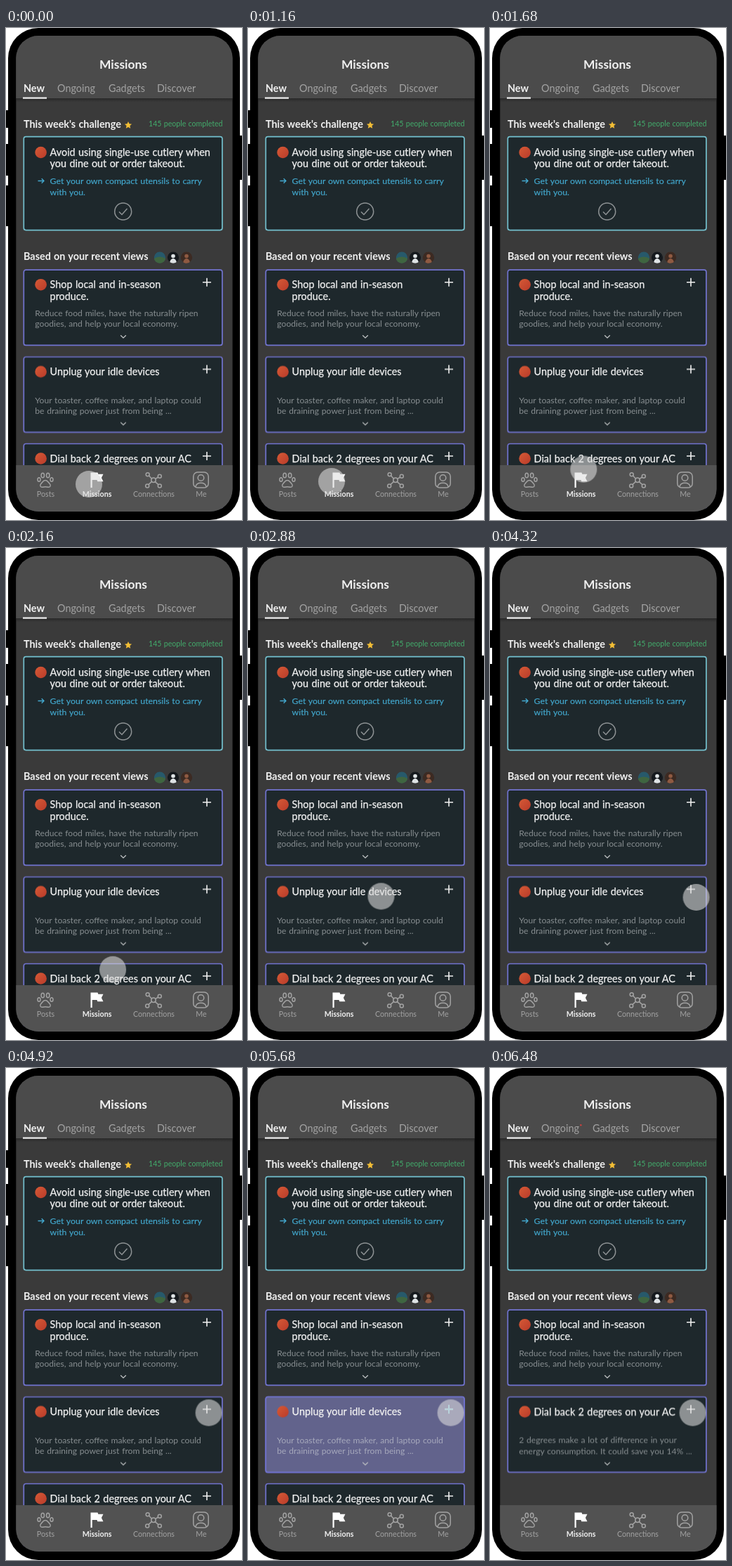
Write an HTML page that moves like this. It is 336 by 700 pixels and loops after 7480 ms.

```html
<!DOCTYPE html>
<html lang="en">
<head>
<meta charset="utf-8">
<title>Missions</title>
<style>
html, body { margin: 0; width: 100%; height: 100%; overflow: hidden; background: #fff; }
svg { display: block; width: 100%; height: 100%; }
text { font-family: Lato, "Open Sans", sans-serif; word-spacing: .05em; fill: #f1f1f1; }
.mid { text-anchor: middle; }
.bold { font-weight: 700; }
.tab { font-size: 14.4px; }
.head { font-size: 14.4px; font-weight: 700; }
.name { font-size: 14.4px; stroke: #f1f1f1; stroke-width: .25; }
.body { font-size: 12.15px; fill: #dfe2e4; fill-opacity: .55; }
.tip { font-size: 12.35px; fill: #43a9cf; stroke: #43a9cf; stroke-width: .15; }
.nav { font-size: 10.7px; text-anchor: middle; }
.dim { fill: #a2a2a2; }
.line { fill: none; stroke: #a2a2a2; stroke-width: 1.5; stroke-linecap: round; stroke-linejoin: round; }
.card { fill: #1e282c; stroke: #7173cf; stroke-width: 1.7; }

#cursor, #glow, #tint, #idle, #next, #badge { animation: 7480ms linear infinite both; }
#cursor { animation-name: travel; }
#glow, #tint { animation-name: glow; }
#idle { animation-name: leave; }
#next { animation-name: rise; }
#badge { animation-name: badge; }

@keyframes travel {
  0%, 10.7% { transform: translate(118px, 649px); }
  15.51% { transform: translate(119px, 645px); }
  20.32% { transform: translate(127px, 637px); }
  28.88% { transform: translate(152px, 600px); }
  30.48% { transform: translate(162px, 562px); }
  32.75% { transform: translate(177px, 522px); animation-timing-function: ease-out; }
  37.43%, 51.87% { transform: translate(189.5px, 495.5px); animation-timing-function: ease-in-out; }
  58.3% { transform: translate(295px, 497px); }
  60.96% { transform: translate(294px, 498px); animation-timing-function: ease-out; }
  64.17%, 100% { transform: translate(288.6px, 490.5px); }
}
@keyframes glow {
  0%, 71.66% { opacity: 0; }
  74.33%, 100% { opacity: 1; }
}
@keyframes leave {
  0%, 77.54% { opacity: 1; }
  81.28%, 100% { opacity: 0; }
}
@keyframes rise {
  0%, 79.14% { transform: translate(0, 591px); animation-timing-function: ease-in-out; }
  86.1%, 100% { transform: translate(0, 467.5px); }
}
@keyframes badge {
  0%, 86.1% { opacity: 0; }
  86.63%, 100% { opacity: 1; }
}
</style>
</head>
<body>
<svg viewBox="0 0 336 700">
  <defs>
    <clipPath id="screen"><rect x="14.3" y="11" width="308.2" height="677" rx="32"/></clipPath>
    <linearGradient id="shade" x2="0" y2="1">
      <stop offset="0" stop-color="#222" stop-opacity=".7"/>
      <stop offset="1" stop-color="#222" stop-opacity="0"/>
    </linearGradient>
    <linearGradient id="disc" x2="1" y2="1">
      <stop offset="0" stop-color="#d65a36"/>
      <stop offset="1" stop-color="#b93b2a"/>
    </linearGradient>
    <clipPath id="face"><circle r="8.3"/></clipPath>
    <rect id="box" x="25.3" y=".5" width="282.6" height="107.2" rx="3"/>
    <path id="plus" d="M280 18h12M286 12v12" fill="none" stroke-width="1.6"/>
    <g id="marks">
      <circle cx="49.6" cy="21.5" r="8.3" fill="url(#disc)"/>
      <use href="#plus" stroke="#f1f1f1"/>
      <path d="M163.2 93.6l3.8 3.6 3.8-3.6" fill="none" stroke="#c4c7c8" stroke-width="1.3"/>
    </g>
    <g id="person">
      <circle cy="-2" r="2.8"/>
      <path d="M-5 9C-5 -1 5 -1 5 9z"/>
    </g>
  </defs>

  <!-- phone body -->
  <path d="M0 117h5v25H0zM0 165h5v45H0zM0 224h5v58H0zM330 153h6v63h-6z"/>
  <rect x="3" width="330" height="700" rx="43"/>

  <g clip-path="url(#screen)">
    <rect x="14" y="11" width="309" height="677" fill="#3a3a3a"/>

    <!-- weekly challenge -->
    <text class="head" x="25" y="142">This week's challenge</text>
    <path d="M174 133l1.5 3.3 3.6.4-2.7 2.4.8 3.6-3.2-1.8-3.2 1.8.8-3.6-2.7-2.4 3.6-.4z" fill="#f2bd35"/>
    <text x="308.5" y="140" text-anchor="end" font-size="10.6" style="fill:#42ab6b">145 people completed</text>
    <rect x="25.3" y="154.6" width="282.6" height="133" rx="3" fill="#1e282c" stroke="#72bfcd" stroke-width="1.7"/>
    <circle cx="49.6" cy="177" r="8.3" fill="url(#disc)"/>
    <text class="name" x="62.6" y="182">Avoid using single-use cutlery when</text>
    <text class="name" x="62.6" y="198.4">you dine out or order takeout.</text>
    <path d="M45.5 217.5h8.5m-3.3-3.2l3.3 3.2-3.3 3.2" fill="none" stroke="#43a9cf" stroke-width="1.3"/>
    <text class="tip" x="62.5" y="222.4">Get your own compact utensils to carry</text>
    <text class="tip" x="62.5" y="238">with you.</text>
    <g fill="none" stroke="#8d9294" stroke-width="1.5">
      <circle cx="166.7" cy="261" r="12"/>
      <path d="M161 261.5l4 4 7.5-8.5"/>
    </g>

    <!-- suggestions -->
    <text class="head" x="25" y="330">Based on your recent views</text>
    <g transform="translate(219 326.5)" clip-path="url(#face)">
      <circle r="8.3" fill="#27596b"/>
      <path d="M-9 2q9-6 18 0v7h-18z" fill="#3f6540"/>
    </g>
    <g transform="translate(238 326.5)" clip-path="url(#face)">
      <circle r="8.3" fill="#15191d"/>
      <use href="#person" fill="#dfe3e5"/>
    </g>
    <g transform="translate(257 326.5)" clip-path="url(#face)">
      <circle r="8.3" fill="#3c2a22"/>
      <use href="#person" fill="#8f5a42"/>
    </g>

    <g transform="translate(0 343.7)">
      <use href="#box" class="card"/>
      <use href="#marks"/>
      <text class="name" x="62.6" y="26.5">Shop local and in-season</text>
      <text class="name" x="62.6" y="43">produce.</text>
      <text class="body" x="41.3" y="66">Reduce food miles, have the naturally ripen</text>
      <text class="body" x="41.3" y="81.5">goodies, and help your local economy.</text>
    </g>

    <g id="idle">
      <g transform="translate(0 467.5)">
        <use href="#box" class="card"/>
        <use id="glow" href="#box" fill="#62638c" stroke="#7173cf" stroke-width="1.7"/>
        <use href="#marks"/>
        <use id="tint" href="#plus" stroke="#72c6dc"/>
        <text class="name" x="62.6" y="26.5">Unplug your idle devices</text>
        <text class="body" x="41.3" y="66">Your toaster, coffee maker, and laptop could</text>
        <text class="body" x="41.3" y="81.5">be draining power just from being ...</text>
      </g>
    </g>

    <g id="next">
      <use href="#box" class="card"/>
      <use href="#marks"/>
      <text class="name" x="62.6" y="26.5">Dial back 2 degrees on your AC</text>
      <text class="body" x="41.3" y="66">2 degrees make a lot of difference in your</text>
      <text class="body" x="41.3" y="81.5">energy consumption. It could save you 14% ...</text>
    </g>

    <!-- header -->
    <rect x="14" y="100" width="309" height="5" fill="url(#shade)"/>
    <rect x="14" y="11" width="309" height="89" fill="#4b4b4b"/>
    <text class="mid bold" x="167" y="58" font-size="17.4">Missions</text>
    <text class="tab bold" x="25" y="91">New</text>
    <text class="tab dim" x="73" y="91">Ongoing</text>
    <text class="tab dim" x="146" y="91">Gadgets</text>
    <text class="tab dim" x="215" y="91">Discover</text>
    <rect x="24" y="98.5" width="34" height="2.2" fill="#f1f1f1"/>
    <circle id="badge" cx="129.3" cy="81.3" r="1.3" fill="#c8423f"/>

    <!-- navigation -->
    <rect x="14" y="622" width="309" height="67" fill="#525252"/>
    <g class="line">
      <path d="M56 643.5c-3.4 0-4.2 3.2-6.2 5-2.3 2.3-.6 5.4 2.4 4.7q3.8-1 7.6 0c3 .7 4.7-2.4 2.4-4.7-2-1.8-2.8-5-6.2-5z"/>
      <ellipse cx="52.3" cy="636.5" rx="2.2" ry="3.3"/>
      <ellipse cx="59.7" cy="636.5" rx="2.2" ry="3.3"/>
      <ellipse cx="47" cy="642.5" rx="2" ry="2.8"/>
      <ellipse cx="65" cy="642.5" rx="2" ry="2.8"/>
      <path d="M207.5 641.2l-4-4.2M212.6 641.6l4-2.6M207.4 645.4l-4.4 4.2M212.4 645.6l4.4 4"/>
      <circle cx="210" cy="643.3" r="3.2"/>
      <circle cx="201.7" cy="635.2" r="2.5"/>
      <circle cx="218.8" cy="637.8" r="2.5"/>
      <circle cx="201.2" cy="651.6" r="2.5"/>
      <circle cx="218.8" cy="651.4" r="2.5"/>
      <rect x="266.8" y="632" width="21.4" height="22" rx="6"/>
      <circle cx="277.5" cy="640" r="4.3"/>
      <path d="M270 652.5c1.5-7 13.5-7 15 0"/>
    </g>
    <path d="M120.5 632.5h10l.8 2.2h7.2l-2.6 5.2 2.6 5.3h-8.2l-.8-2.2h-6.8v11h-2.2z" fill="#fff"/>
    <text class="nav dim" x="56.5" y="667">Posts</text>
    <text class="nav bold" x="129.5" y="667">Missions</text>
    <text class="nav dim" x="210.5" y="667">Connections</text>
    <text class="nav dim" x="278" y="667">Me</text>

    <circle id="cursor" r="19" fill="#dcdcdc" fill-opacity=".58"/>
  </g>
</svg>
</body>
</html>
```
